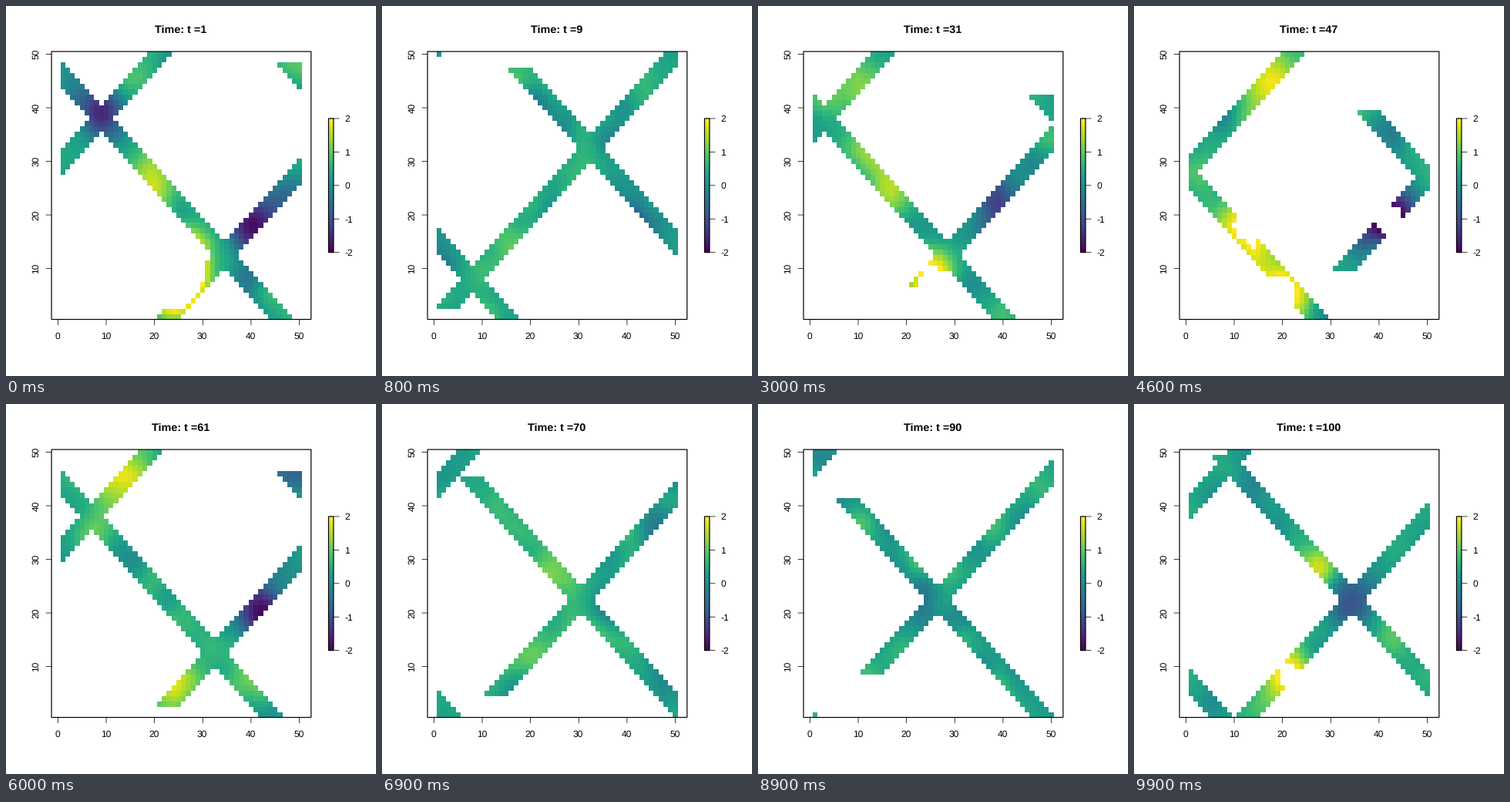
Write a matplotlib script that moves like this. It is 480 px wide and 480 px high and loops after 10000 ms.

```python
import numpy as np
import matplotlib.pyplot as plt
from matplotlib.animation import FuncAnimation
from matplotlib.patches import Rectangle

SIZE, DPI, STEPS, N = 480, 100, 100, 50
PX = 72 / DPI
LEFT, RIGHT, TOP, BOTTOM = 59.04, 395.76, 59.04, 406.56
BAR_L, BAR_R, BAR_T, BAR_B = 418.44, 424.92, 145.92, 319.68
THIN, BOX = 0.75, 1.2

plt.rcParams["font.family"] = "Liberation Sans"
plt.rcParams["text.hinting"] = "none"
X, Y = np.meshgrid(np.arange(1, N + 1), np.arange(1, N + 1))


def px_x(v):
    return 67.4 + 6.262 * v


def px_y(v):
    return BOTTOM - (v - 0.5) * (BOTTOM - TOP) / N


def swath(t):
    """One falling and one rising track, each stepping round every 50 days."""
    m = t % 50
    top = 49 + (-m // 5)
    s = (8 - 10 * m) % 50 + top
    down = (abs(X + Y - s) <= 2) | (abs(X + 49 + Y - s) <= 2)
    low = 1 + (m + 1) // 5
    d = low - (13 + 10 * m) % 50
    up = (abs(Y - X - d) <= 2) | (abs(Y - X - 51 - d) <= 2)
    return (down & (Y <= top)) | (up & (Y >= low))


# Warm and cold spots that come and go: day, x, y, strength
SPOTS = [
    (1, 24, 10, 6), (1, 40, 19, -1.8), (1, 9, 38, -1.5), (1, 19, 28, 1.2),
    (17, 19, 15, 1.3), (17, 26, 8, 1.2), (17, 44, 15, -2),
    (31, 25, 9, 1.7), (31, 38, 22, -1.3), (31, 17, 24, 1),
    (47, 12, 16, 2), (47, 21, 6, 1.4), (47, 42, 19, -2.3), (47, 16, 44, 1.3),
    (61, 24, 5, 1.3), (61, 42, 21, -1.8), (61, 14, 45, 1.5),
    (80, 18, 13, 2.1), (80, 33, 18, -1),
    (100, 20, 8, 1.5), (100, 28, 29, 1.2), (100, 35, 22, -1),
]


def noise(rng, length=3.5, keep=0.9):
    """Smooth random fields that change slowly from day to day."""
    i = np.arange(N)
    k = np.exp(-((i[:, None] - i) / length) ** 2)
    k /= np.sqrt((k ** 2).sum(1, keepdims=True) if False else
                 (k ** 2).sum(1)[:, None])
    z = k @ rng.standard_normal((N, N)) @ k.T
    while True:
        yield z
        step = k @ rng.standard_normal((N, N)) @ k.T
        z = keep * z + np.sqrt(1 - keep ** 2) * step


def spots(t, width=4.2, life=8):
    return sum(a * np.exp(-((X - x) ** 2 + (Y - y) ** 2) / (2 * width ** 2)
                          - ((t - day) / life) ** 2)
               for day, x, y, a in SPOTS)


days = range(1, STEPS + 1)
fields = [0.3 + spots(t) + 0.3 * z
          for t, z in zip(days, noise(np.random.default_rng(4)))]

# Grid cell under the centre of each pixel
centre = np.arange(SIZE) + 0.5
cols = np.floor((centre - px_x(0.5)) / (px_x(1) - px_x(0))).astype(int)
rows = np.floor((BOTTOM - centre) / (px_y(0) - px_y(1))).astype(int)
in_x, in_y = (cols >= 0) & (cols < N), (rows >= 0) & (rows < N)
inside = np.ix_(in_y, in_x)
cells = np.ix_(rows[in_y], cols[in_x])

fig = plt.figure(figsize=(SIZE / DPI, SIZE / DPI), dpi=DPI, facecolor="white")
ax = fig.add_axes([0, 0, 1, 1])
ax.axis("off")

cmap = plt.get_cmap("viridis", 64).with_extremes(
    bad="white", over="white", under="white")
opts = dict(cmap=cmap, vmin=-2, vmax=2, interpolation="nearest", aspect="auto")
image = ax.imshow(np.full((SIZE, SIZE), np.nan),
                  extent=(0, SIZE, SIZE, 0), **opts)
ax.imshow(np.linspace(1.99, -1.99, 64)[:, None],
          extent=(BAR_L, BAR_R, BAR_B, BAR_T), **opts)
ax.set(xlim=(0, SIZE), ylim=(SIZE, 0))


def line(xs, ys):
    ax.plot(xs, ys, color="black", lw=THIN * PX, snap=False,
            solid_capstyle="round")


def frame(x0, x1, y0, y1, width):
    ax.add_patch(Rectangle((x0, y0), x1 - x0, y1 - y0, fill=False,
                           ec="black", lw=width * PX, snap=False, zorder=3))


def label(x, y, s, size=12, **kw):
    return ax.text(x, y, s, fontsize=size * PX, va="baseline",
                   rotation_mode="anchor", **kw)


frame(LEFT, RIGHT, TOP, BOTTOM, BOX)
frame(BAR_L, BAR_R, BAR_T, BAR_B, BOX)
for v in range(0, 51, 10):
    line([px_x(v)] * 2, [BOTTOM, BOTTOM + 7.2])
    label(px_x(v) - 0.6, 432, str(v), ha="center")
    if v:
        line([LEFT, LEFT - 7.2], [px_y(v)] * 2)
        label(42.2, px_y(v), str(v), ha="center", rotation=90)
for v in range(-2, 3):
    y = (BAR_T + BAR_B) / 2 - v * (BAR_B - BAR_T) / 4
    line([BAR_R, BAR_R + 7.2], [y, y])
    label(439.3, y + 4.3, str(v), ha="left")
title = label(226.8, 35, "", size=14.4, weight="bold", ha="center")


def update(i):
    t = i + 1
    field = np.where(swath(t), fields[i], np.nan)
    stage = np.full((SIZE, SIZE), np.nan)
    stage[inside] = field[cells]
    image.set_data(stage)
    title.set_text(f"Time: t ={t}")
    return image, title


anim = FuncAnimation(fig, update, frames=STEPS, interval=100,
                     repeat=True, repeat_delay=0)
plt.show()
```
